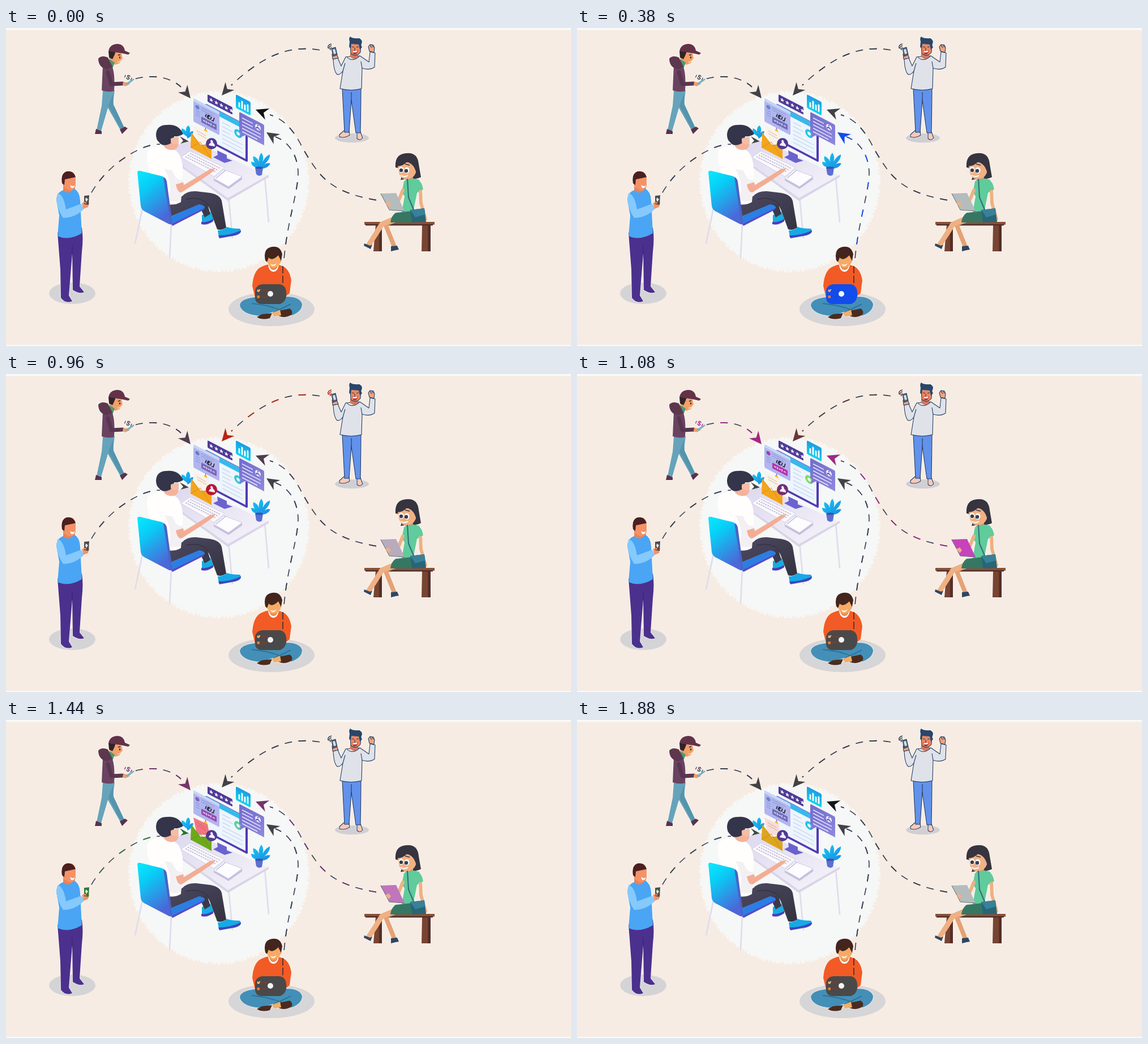
Animation, 998 px wide and 561 px high, one loop 1.9 s. Source, as an HTML page:

```html
<!DOCTYPE html>
<html lang="en">
<head>
<meta charset="utf-8">
<title>Connected people</title>
<style>
html,body{margin:0;width:100%;height:100%;overflow:hidden;background:#f6ece3}
svg{display:block;width:100vw;height:100vh}
.person{filter:drop-shadow(0 0 1px #fff)}
.tint{fill:currentColor}
.line{fill:none;stroke:currentColor;stroke-linecap:butt}
.ink{stroke:#263c60;stroke-width:1.1;stroke-linejoin:round}
.limb{fill:none;stroke-linecap:round;stroke-linejoin:round}
</style>
</head>
<body>
<svg viewBox="0 0 998 561" preserveAspectRatio="none">
<defs>
  <linearGradient id="chair" x1="0" y1="0" x2=".5" y2="1"><stop stop-color="#08eaff"/><stop offset=".35" stop-color="#08cdf6"/><stop offset="1" stop-color="#4b68d8"/></linearGradient>
  <linearGradient id="card" x1="0" y1="0" x2="1" y2="1"><stop stop-color="#a9b9ee"/><stop offset="1" stop-color="#b8b2ee"/></linearGradient>
  <linearGradient id="chart" x1="0" y1="0" x2="0" y2="1"><stop stop-color="#1b9de4"/><stop offset="1" stop-color="#11d3ee"/></linearGradient>
  <linearGradient id="chat" x1="0" y1="0" x2="1" y2="1"><stop stop-color="#716ccb"/><stop offset="1" stop-color="#928ce0"/></linearGradient>
  <linearGradient id="desk" x1="0" y1="0" x2="1" y2="1"><stop stop-color="#dcd7ed"/><stop offset="1" stop-color="#f7f5fb"/></linearGradient>
  <linearGradient id="pants" x1="0" y1="0" x2="1" y2="1"><stop stop-color="#4d4a63"/><stop offset="1" stop-color="#34323f"/></linearGradient>
  <linearGradient id="leaf" x1="0" y1="0" x2="1" y2="1"><stop stop-color="#14cdf4"/><stop offset="1" stop-color="#1c88e2"/></linearGradient>
</defs>
<rect width="998" height="561" fill="#f6ece3"/>
<path d="M0 0H998V3.5H0ZM0 559H998V561H0Z" fill="#fafafa"/>
<circle cx="376" cy="271" r="157" fill="#f6f7f7"/>
<circle cx="376" cy="271" r="158" fill="none" stroke="#f8f7f5" stroke-width="4" stroke-dasharray="5 3 2 4 7 2"/>

<g id="paths"></g>

<!-- workstation -->
<g>
  <g fill="none" stroke="#dfdcec" stroke-width="2.6">
    <path d="M393 296L400 371M457 262L464 343M345 312L357 347M241 318L228 380M292 344L289 406"/>
  </g>
  <path d="M282 211L329 199L464 261L392 303L306 240Z" fill="url(#desk)"/>
  <path d="M392 300L464 259V263L392 305L306 243V239Z" fill="#d9d4e9"/>

  <g fill="url(#leaf)">
    <path d="M319 191Q307 184 311 177Q320 180 320 191Q315 176 322 172Q329 178 321 191Q324 181 331 182Q330 190 321 195Z"/>
    <path d="M446 247Q433 245 433 236Q443 236 447 246Q434 234 437 226Q447 229 448 243Q444 228 451 220Q458 229 450 243Q456 227 466 223Q467 233 451 245Q460 236 467 239Q462 249 448 248Z"/>
  </g>
  <path d="M440 246L454 247L452 259Q447 263 442 258Z" fill="#5b6fd0"/>
  <ellipse cx="447" cy="246.500" rx="7" ry="2" fill="#3f4fb0"/>

  <path d="M373 216L390 224V230L400 234L386 238L366 228L374 224Z" fill="#6a62cf"/>
  <g transform="matrix(1 .52 0 1 352 133)">
    <rect width="75" height="65" rx="3" fill="#513bb3"/>
    <rect x="1" y="1" width="70" height="60" fill="#edf5fd"/>
    <path d="M1 1H71V10H1Z" fill="#37b9ec"/>
    <path d="M30 18H44M30 25H48M30 32H44M30 39H66M30 46H66M30 53H66" stroke="#ccd8f2" stroke-width="1.6"/>
    <circle class="line" data-tint="#26c6e8 3:#a5e52b" cx="58" cy="23" r="5" stroke-width="4"/>
  </g>
  <g transform="matrix(1 .52 0 1 356 117)">
    <rect width="44" height="13" rx="1.5" fill="#4d3a96"/>
    <text x="2" y="10" font-size="10" fill="#fff" font-family="'DejaVu Sans',sans-serif">★★★★★</text>
  </g>
  <g transform="matrix(1 .52 0 1 331 124)">
    <rect width="46" height="41" rx="2" fill="url(#card)"/>
    <path d="M0 2Q0 0 2 0H44Q46 0 46 2V5H0Z" fill="#c9d5f6"/>
    <circle class="tint" data-tint="#6f7fcb 3:#c21aa5" cx="7" cy="12" r="3.5"/>
    <path d="M4 19H11M4 23H11M4 27H11M14 9H38M14 13H34" stroke="#8e97d8" stroke-width="1.2"/>
    <path d="M21 22L23 16M24 22L26 16H29L26 19L28 22H24M30 22L32 16M32 22H35L37 15" stroke="#28283a" stroke-width="1.5" fill="none"/>
    <rect class="tint" data-tint="#706eb9 3:#d01ba9" x="14" y="25" width="27" height="10" rx="1"/>
    <path d="M17 30H21M23 28V32M25 30H29M31 28V32M34 30H38" stroke="#e4e2fa" stroke-width="1.6"/>
  </g>
  <g transform="matrix(1 .52 0 1 406 117)">
    <rect width="26" height="24" rx="2" fill="url(#chart)"/>
    <path d="M6 20V11M11 20V6M16 20V10M21 20V7" stroke="#fff" stroke-width="2.700"/>
  </g>
  <g transform="matrix(1 .52 0 1 412 148)">
    <path d="M2 0H42Q44 0 44 2V36H10L1 45L3 36H2Q0 36 0 34V2Q0 0 2 0Z" fill="url(#chat)"/>
    <path d="M5 8H24M5 14H24M5 20H38M5 26H38M5 32H32" stroke="#edeaff" stroke-width="1.7"/>
    <circle cx="33" cy="10" r="5" fill="#edeaff"/>
    <path d="M30 13Q33 8 36 13M33 6V8" stroke="#5650b4" stroke-width="2" fill="none"/>
  </g>

  <path d="M350 178L354 179L357 187H350Z" fill="#f7bd24"/>
  <path class="tint" data-tint="#faf2e8 4:#e9233d" d="M331 172L356 184L360 204L337 201Z"/>
  <path class="line" data-tint="#d9c8b8 4:#d32a40" d="M337 181L353 190M338 186L354 195" stroke-width="1.3"/>
  <path class="tint" data-tint="#f3a51c 4:#14ae18" d="M327 184L344 207L363 204V231L326 211Z"/>
  <path class="line" data-tint="#dd8d14 4:#129a12" d="M326 211L343 201L363 231M327 185L344 207L362 205" stroke-width="1"/>
  <circle class="tint" data-tint="#513a91 2:#c3122d" cx="363" cy="204" r="10"/>
  <path d="M358 207Q360 202 362 203L361 199Q363 196 365 199L366 203Q369 204 369 209Z" fill="#f5eff8"/>

  <path d="M309 228L325 217L386 246L367 262Z" fill="#faf9fd" stroke="#d3cfe3"/>
  <path d="M317 227L371 254M321 224L375 251M325 221L379 248" stroke="#c6c1d8" stroke-width="2" stroke-dasharray="3 1.300"/>
  <path d="M367 265L385 250L417 262L393 280Z" fill="#fdfcff" stroke="#cfcae2"/>
  <path d="M367 266L393 280L417 263V267L393 284L367 269Z" fill="#c3bfde"/>
  <path d="M371 265L388 251" stroke="#8f8bc7"/>

  <path class="tint" data-tint="#444448 4:#169020" d="M307 191L323 200L308 204L313 199Z"/>

  <path d="M346 330L361 324L367 338Q354 348 346 344Z" fill="#18acdf"/>
  <path d="M345 342Q354 344 366 337V341Q354 349 345 346Z" fill="#4a3cbd"/>
  <path d="M335 300L354 305L361 328L351 334Z" fill="#3b394b"/>
  <path d="M288 311L312 296Q320 287 336 288L361 291Q378 294 381 305L389 352Q380 358 373 355L360 320Q355 307 340 312L292 332Z" fill="url(#pants)"/>
  <path d="M318 302Q345 296 358 312" stroke="#2c2a38" fill="none"/>
  <path d="M374 357Q384 357 390 351Q398 354 413 354Q418 360 408 363L376 369Z" fill="#17a9e5"/>
  <path d="M375 366Q396 366 415 357Q416 363 405 366L377 371Z" fill="#3e46bd"/>

  <path d="M292 332L341 311Q354 313 350 319L294 349Z" fill="#2a7ee4"/>
  <path d="M292 346L349 318V321L294 349Z" fill="#5b4ac0"/>
  <path d="M250 217Q257 208 273 208Q294 209 304 220Q314 234 312 261L309 307Q299 313 286 311Q269 290 256 258Q246 234 250 217Z" fill="#fffefd"/>
  <path d="M280 249Q296 278 287 303Q300 309 309 303L312 268Q300 270 294 251Z" fill="#f3f0f4"/>
  <path d="M300 276L313 272L314 277L341 261L360 249L370 247L366 253L343 269L310 290Q303 291 300 276Z" fill="#f3ad94"/>
  <path d="M282 202L304 192Q307 210 299 214Q287 218 279 209Z" fill="#f3b39a"/>
  <path d="M265 188Q266 171 284 171Q305 169 313 187Q306 192 297 191Q296 202 288 205Q276 210 270 201Q265 197 265 188Z" fill="#34344a"/>
  <path d="M291 195Q302 191 305 193L304 204Q298 207 291 202Z" fill="#f6bda6"/>
  <path d="M232 254Q233 251 237 252L274 261Q281 263 283 270L293 344Q292 347 288 346L244 323Q239 320 238 314Z" fill="url(#chair)"/>
  <path d="M278 263Q283 265 284 271L294 345L291 347Z" fill="#4b62c4"/>
</g>

<!-- walker in a cap -->
<g class="person">
  <path d="M171 110H192L189 133L209 176L202 180L180 141L168 182L160 180L169 137Z" fill="#66a3ba"/>
  <path d="M189 116L190 136L209 176L204 180L181 137Z" fill="#5594ad"/>
  <path d="M159 178L169 182V187H157ZM201 179L210 174L215 177L205 187Z" fill="#59324c"/>
  <path d="M183 42L203 39L205 49L206 54L203 57L201 62L193 65L182 59Z" fill="#f0a068"/>
  <path d="M183 55L192 61L188 72L180 67Z" fill="#4c9a74"/>
  <path d="M171 65L187 67Q193 79 191 111Q181 114 169 110Z" fill="#6a4360"/>
  <path d="M163 54Q169 47 180 52L188 68L179 73Q163 70 163 54Z" fill="#5c374e"/>
  <path class="limb" d="M180 78L186 99L206 98" stroke="#593650" stroke-width="7"/>
  <path d="M207 95L215 96L219 99L211 103L206 101Z" fill="#f0a068"/>
  <path d="M211 98L225 89L227 91L214 101Z" fill="#78b4c8"/>
  <path d="M181 41L194 41L191 49L188 55L182 52Z" fill="#302329"/>
  <path d="M181 41Q183 29 196 28Q208 28 210 40L219 44L216 47L202 44Z" fill="#633248"/>
  <path d="M198 48L202 47" stroke="#302329" stroke-width="1.600"/>
  <ellipse cx="201" cy="52" rx="1.200" ry="1.800" fill="#302329"/>
  <path d="M197 60Q200 61 202 58" stroke="#fff" fill="none"/>
  <g class="tint" data-tint="#44434c 3:#c81ca8" transform="translate(216 87) rotate(25)">
    <text x="-3.500" y="4" font-size="12" font-weight="700" font-family="'Liberation Sans',sans-serif">$</text>
    <path class="line" d="M-6 -2V3M6 -2V3" stroke-width="1.300"/>
  </g>
</g>

<!-- standing man -->
<g>
  <ellipse cx="117" cy="468" rx="41" ry="19" fill="#d4d4d7"/>
  <g class="person">
    <path d="M91 361L134 352Q137 370 134 395L130 456L138 466Q130 470 118 462L117 398L111 472L117 482Q105 487 97 476L96 426Z" fill="#4c308d"/>
    <path d="M117 384V399" stroke="#38206f"/>
    <path d="M101 274H121L122 290L111 295L101 290Z" fill="#e98258"/>
    <path d="M99 266Q98 254 109 253Q121 251 123 264V279Q119 288 110 286L101 280Z" fill="#f49267"/>
    <path d="M99 274Q96 257 107 253Q119 251 123 263L104 267L103 277Z" fill="#4a2020"/>
    <path d="M113 277Q119 281 122 277Q120 284 115 282Z" fill="#fff"/>
    <path d="M101 286Q111 296 120 283Q130 288 131 304L134 362Q111 376 91 367L94 331L89 304Q89 290 101 286Z" fill="#4aa5f4"/>
    <path d="M91 291Q102 294 106 320L133 310L138 319Q122 335 101 335Q91 321 89 304Z" fill="#86c9fc"/>
    <path d="M134 309L141 305L147 308L145 316L137 319Z" fill="#f49267"/>
    <path class="tint" data-tint="#4b4a4e 4:#159729" d="M138 296L147 295L146 312L138 311Z"/>
    <path d="M141 299L145 302L142 307L140 303Z" fill="#e7e7e7"/>
    <path d="M137 307L142 309M137 311L141 313" stroke="#f49267" stroke-width="2"/>
  </g>
</g>

<!-- cheering man -->
<g>
  <ellipse cx="611" cy="194" rx="30" ry="8" fill="#cfcfd4"/>
  <g class="person">
    <path d="M597 181L606 181L607 189Q598 195 589 192L589 188ZM620 183H626L630 194Q625 200 620 195Z" fill="#f7c9b7" class="ink"/>
    <path d="M594 107H627Q627 130 626 185H618L610 127L606 184H598Z" fill="#6292eb" class="ink"/>
    <path d="M610 113V129" class="ink"/>
    <path d="M600 51L592 67L586 53L578 55Q579 77 585 82Q590 83 595 76L590 107Q611 112 628 107L629 71Q643 75 651 69L652 44L643 42L641 60L625 49Z" fill="#dfe2e9" class="ink"/>
    <path d="M595 76L599 62M629 71L627 59M602 51Q611 61 624 50" class="ink" fill="none"/>
    <path d="M609 43L622 45V51Q615 58 607 50Z" fill="#d87657"/>
    <path d="M608 26L627 27L626 43Q619 52 609 45Z" fill="#e98962" class="ink"/>
    <path d="M606 33L607 24Q605 18 608 15Q612 19 624 18Q632 22 627 30L629 34L625 38L623 29L610 28L609 37Z" fill="#29466b"/>
    <path d="M611 33L615 34M619 34L623 33M616 35V40" class="ink"/>
    <path d="M611 40Q617 42 622 39Q620 48 614 46Z" fill="#b82f35"/><path d="M612 41L621 40L619 43H613Z" fill="#fff"/>
    <path d="M642 41L640 33L643 29L649 30L651 35L650 43Z" fill="#f1a47e" class="ink"/>
    <path d="M643 30L646 35M646 29L649 34" class="ink"/>
    <path d="M577 55L576 46L583 44L587 53Z" fill="#f1a47e" class="ink"/>
    <path d="M575 36L582 34L585 47L578 50Z" fill="#526577" class="ink"/>
    <path d="M577 38L581 37L583 45L579 46Z" fill="#d6e0e6"/>
    <path class="line" data-tint="#3c414e 2:#c42814" d="M573 39Q572 36 575 34M571 37Q569 33 575 31M569 36Q567 30 575 28" stroke-width="1.500"/>
  </g>
</g>

<!-- woman on a bench -->
<g class="person">
  <path d="M653 347H664V394H649ZM735 347H750V394H734Z" fill="#784432"/>
  <path d="M659 347H664V394H659ZM745 347H750V394H745Z" fill="#552e28"/>
  <path d="M633 342H757V347H633Z" fill="#885139"/><path d="M635 346H754V348.500H635Z" fill="#552e28"/>
  <path class="limb" d="M695 336L670 346L686 386" stroke="#e5a276" stroke-width="8"/>
  <path class="limb" d="M697 332L664 346L654 362L641 382" stroke="#efb083" stroke-width="9"/>
  <path d="M633 380L643 384L647 382L644 390L632 384ZM680 385L691 384L694 391L688 392L680 394Z" fill="#304660"/>
  <path d="M688 246Q686 223 706 221Q727 218 729 240L733 263Q724 268 716 265L697 268L703 249Z" fill="#35343f"/>
  <path d="M707 258H719V271H705Z" fill="#d98d65"/>
  <path d="M692 243Q696 235 710 237Q723 237 725 251Q722 267 705 267Q693 265 692 243Z" fill="#f1b184"/>
  <path d="M690 244Q690 228 703 227Q723 225 728 248L725 258Q722 240 708 236Q703 243 690 244Z" fill="#35343f"/>
  <path d="M703 270Q718 262 730 268L736 284L726 291L719 326L699 325L704 297L699 290Z" fill="#60cb9b"/>
  <path class="limb" d="M732 286L733 309L741 337" stroke="#efb083" stroke-width="6"/>
  <path d="M726 267Q735 270 737 285L727 287Z" fill="#60cb9b"/>
  <path class="limb" d="M701 286L692 308L677 312" stroke="#efb083" stroke-width="6"/>
  <path d="M688 326L716 323L719 343H679Q680 332 688 326Z" fill="#367763"/>
  <path d="M709 266L711 299L722 325" fill="none" stroke="#32687c" stroke-width="2"/>
  <path d="M714 321L739 318L742 342L717 343Z" fill="#286577"/><path d="M714 321L739 318L740 329L723 334Z" fill="#388198"/>
  <path class="tint" data-tint="#b5bcbd 3:#cf0ebd" d="M661 292L689 291L704 323L677 321Z"/>
  <path d="M662 292L677 321L704 323" fill="none" stroke="#68757a"/>
  <path d="M670 309L676 306L680 311L676 316Z" fill="#efb083"/>
  <g fill="#fff"><ellipse cx="698" cy="250" rx="4.500" ry="5.500"/><ellipse cx="708" cy="251" rx="4.500" ry="5.500"/></g>
  <g fill="#334052"><circle cx="698" cy="251" r="3.200"/><circle cx="707" cy="252" r="3.200"/></g>
  <path d="M693 241L700 240M705 240L713 242" stroke="#35343f" stroke-width="1.500"/>
  <path d="M697 260Q704 264 710 260" stroke="#fff" stroke-width="2" fill="none"/>
</g>

<!-- seated man with laptop -->
<g>
  <ellipse cx="469" cy="496" rx="76" ry="30" fill="#d6d5d7"/>
  <g class="person">
    <path d="M439 475Q414 478 413 489Q416 505 449 508L475 500L505 507Q523 500 523 487Q519 474 496 474Z" fill="#438fb7"/>
    <path d="M434 486Q465 489 486 498M503 487L472 502" stroke="#286c92" fill="none" stroke-width="1.500"/>
    <path d="M443 510L452 505L470 503L466 512Q452 516 443 510ZM482 499L501 495Q508 500 504 506Q492 513 482 508Z" fill="#4b2b1e"/>
    <path d="M469 503L484 497L486 507L474 509Z" fill="#f3ad69"/>
    <path d="M454 420Q469 413 489 420Q501 426 504 445L501 468L491 476H440L435 455Q437 425 454 420Z" fill="#f25b25"/>
    <path d="M463 417H482Q480 430 472 430Q464 429 463 417Z" fill="#fff"/>
    <path d="M464 414H481Q480 427 472 427Q465 426 464 414Z" fill="#e78d50"/>
    <path d="M460 404L485 399L486 412Q480 424 471 423Q461 420 460 404Z" fill="#f6aa65"/>
    <path d="M458 410Q454 391 466 387Q484 382 488 399L486 411L481 401Q470 412 464 405L461 413Z" fill="#43251d"/>
    <path d="M467 416Q472 420 478 415Q474 422 469 419Z" fill="#fff"/>
    <path d="M489 420V451" stroke="#43302d" stroke-width="1.700" stroke-dasharray="13 4"/>
    <path class="tint" data-tint="#4a4949 1:#124ced" d="M453 452H484Q494 454 495 465Q497 482 484 487H451Q440 486 440 475V463Q442 453 453 452Z"/>
    <path class="line" data-tint="#8f3b2b 1:#1a48cf" d="M449 463H461L464 466M449 474H461L464 471" stroke-width="1.200"/>
    <path d="M443.500 461H448V465.500H443.500ZM443.500 472H448V476.500H443.500Z" fill="#ee7c33"/><path d="M444 463L446 465L449 461" fill="none" stroke="#fff"/>
    <circle cx="467" cy="469" r="5" fill="#f4f4f4"/>
  </g>
</g>

<g id="heads"></g>
</svg>
<script>
const LOOP = 1900, HOLD = 200, CYCLE = 380, STEP = 20, STATES = 5;
const INK = '#343b50', HEAD = '#414146';
const DASH = 13, PITCH = 24.6, LEAD = 2;

// route, highlighted state and colour, first highlighted dash, arrow tip and angle
const routes = [
  {d: 'M227 90C250 83 287 83 309 104', state: 3, color: '#c81d9f', first: 1, tip: [326, 124], angle: 51},
  {d: 'M556 39C508 31 462 41 398 101', state: 2, color: '#c32110', first: 1, tip: [381, 119], angle: 131},
  {d: 'M656 304C610 296 575 284 550 252Q535 232 522 208C508 180 490 160 466 153', state: 3, color: '#c81d9f', first: 0, tip: [441, 144], angle: 201, rest: '#111114'},
  {d: 'M491 408C497 340 516 290 516 255C515 222 498 200 476 192', state: 1, color: '#124ced', first: 1, tip: [460, 184], angle: 213},
  {d: 'M150 292C165 265 195 232 240 212Q256 205 272 205', state: 4, color: '#249a35', first: 1}
];

const paths = document.getElementById('paths');
const heads = document.getElementById('heads');
for (const r of routes) {
  const tint = `${r.state}:${r.color}`;
  paths.innerHTML += `<path d="${r.d}" fill="none" stroke="${INK}" stroke-width="1.6" stroke-dasharray="${DASH} ${PITCH - DASH}" stroke-dashoffset="${-LEAD}"/>
    <path class="line" data-tint="${INK} ${tint}" d="${r.d}" stroke-width="1.8" stroke-dasharray="${DASH} ${2 * PITCH - DASH}" stroke-dashoffset="${-LEAD - r.first * PITCH}"/>`;
  if (r.tip) {
    const rest = r.rest ? ` 0:${r.rest}` : '';
    heads.innerHTML += `<path class="tint" data-tint="${HEAD} ${tint}${rest}" d="M0 0L-22-10.5L-15 0L-22 10.5Z" transform="translate(${r.tip}) rotate(${r.angle})"/>`;
  }
}

const rgb = hex => [1, 3, 5].map(i => parseInt(hex.slice(i, i + 2), 16));
const tinted = [...document.querySelectorAll('[data-tint]')].map(el => {
  const [base, ...accents] = el.dataset.tint.split(' ');
  return {el, base: rgb(base), accents: accents.map(a => {
    const [state, color] = a.split(':');
    return {state: +state, color: rgb(color)};
  })};
});

function stateWeights(t) {
  const weights = Array(STATES).fill(0);
  if (t < HOLD) {
    weights[0] = 1;
    return weights;
  }
  const from = Math.floor((t - HOLD) / CYCLE);
  const elapsed = t - HOLD - from * CYCLE;
  const p = Math.min(1, (Math.floor(elapsed / STEP) + 1) / 10);
  weights[from] = 1 - p;
  weights[(from + 1) % STATES] += p;
  return weights;
}

function render(t) {
  const weights = stateWeights(t);
  for (const {el, base, accents} of tinted) {
    const mixed = base.map((v, i) => accents.reduce((sum, a) => sum + weights[a.state] * (a.color[i] - v), v));
    el.style.color = `rgb(${mixed.map(Math.round)})`;
  }
}

const start = performance.now();
function tick() {
  render((performance.now() - start) % LOOP);
  requestAnimationFrame(tick);
}
tick();
</script>
</body>
</html>
```
